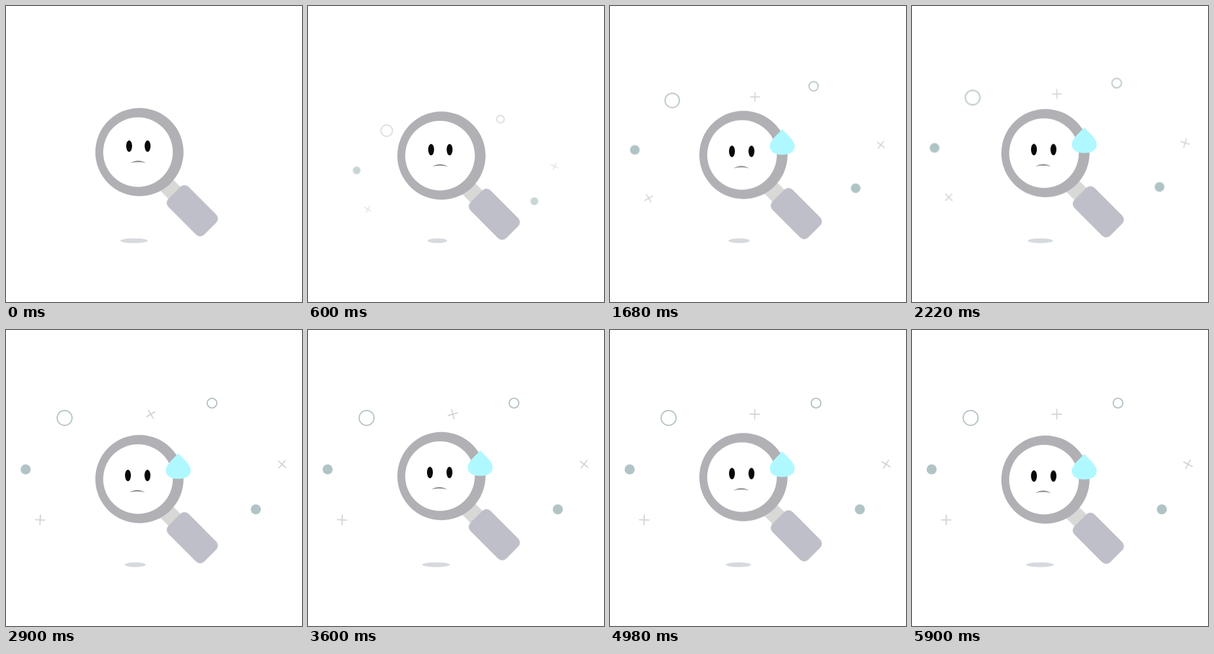
An HTML page without scripts for the animation above (5.92 s loop, 500 by 500 pixels).

```html
<!DOCTYPE html>
<html lang="en">
<head>
<meta charset="utf-8">
<title>Nothing found</title>
<style>
html, body { margin: 0; width: 100%; height: 100%; overflow: hidden; background: #fff; }
svg { display: block; width: 100vw; height: 100vh; }

.anim { animation: 5920ms linear infinite; }
.bob { animation-name: bob; }
.shadow { animation-name: shadow; transform-origin: 224.5px 396.5px; }
.bits { animation-name: burst; transform-origin: 247.7px 420.6px; }
.spin-l { animation-name: spin-l; }
.spin-t { animation-name: spin-t; }
.spin-r { animation-name: spin-r; }
.eye-l { animation-name: look; --dx: -2px; }
.mouth { animation-name: look; --dx: -1.4px; }
.eye-r { animation-name: look; --dx: -.3px; }
.drop { animation-name: drip; transform-origin: 291px 203px; }

@keyframes bob {
  0%, 20.27%, 40.541%, 60.811%, 81.081% { transform: translateY(0); }
  10.135%, 30.405%, 50.676%, 70.946%, 91.216%, 100% { transform: translateY(6px); }
}
@keyframes shadow {
  0%, 20.27%, 40.541%, 60.811%, 81.081%, 99.66%, 100% { transform: scaleX(1); }
  10.135%, 30.405%, 50.676%, 70.946%, 91.216% { transform: scaleX(.71); }
}
@keyframes burst {
  0% { transform: scale(0); opacity: 0; }
  14.53% { transform: scale(1.105); opacity: 1; }
  23.65% { transform: scale(.95); }
  48.99%, 100% { transform: scale(1); opacity: 1; }
}
@keyframes spin-l {
  0% { transform: rotate(80deg); }
  10.135% { transform: rotate(33deg); }
  20.27% { transform: rotate(-17deg); }
  37.5% { transform: rotate(-45deg); }
  48.99% { transform: rotate(-87deg); }
  72.64% { transform: rotate(-87deg); }
  100% { transform: rotate(-90deg); }
}
@keyframes spin-t {
  0%, 37.5% { transform: rotate(0deg); }
  48.99% { transform: rotate(-31deg); }
  72.64% { transform: rotate(2deg); }
  91.2%, 100% { transform: rotate(0deg); }
}
@keyframes spin-r {
  0% { transform: rotate(0deg); }
  10.135% { transform: rotate(25deg); }
  20.27% { transform: rotate(55deg); }
  37.5% { transform: rotate(17deg); }
  48.99% { transform: rotate(41deg); }
  72.64% { transform: rotate(35deg); }
  100% { transform: rotate(27deg); }
}
@keyframes look {
  0%, 16.2% { transform: translate(0, 0); }
  23%, 100% { transform: translate(var(--dx), 4px); }
}
@keyframes drip {
  0%, 19.3% { transform: translate(2px, -8px) scale(.4); opacity: 0; }
  20.27% { transform: translate(2px, -7px) scale(.45); opacity: .15; }
  27%, 100% { transform: none; opacity: 1; }
}
</style>
</head>
<body>
<svg viewBox="0 0 500 500">
  <defs>
    <path id="cross" d="M-8.7 0H8.7M0-8.7V8.7" stroke="#cfd2d5" stroke-width="1.8"/>
  </defs>

  <g class="anim bits">
    <g fill="none" stroke="#b2c0c4" stroke-width="2">
      <circle cx="99" cy="148.5" r="12.6"/>
      <circle cx="348" cy="123.5" r="8.2"/>
    </g>
    <g fill="#b1c4c5">
      <circle cx="33.2" cy="235.5" r="8.5"/>
      <circle cx="422" cy="303" r="8.5"/>
    </g>
    <g transform="translate(57.7 320.8)"><use href="#cross" class="anim spin-l"/></g>
    <g transform="translate(244.6 142.3)"><use href="#cross" class="anim spin-t"/></g>
    <g transform="translate(466.3 226.8)"><use href="#cross" class="anim spin-r"/></g>
  </g>

  <ellipse class="anim shadow" cx="216.3" cy="396.5" rx="23.3" ry="4" fill="#d6dade"/>

  <g class="anim bob">
    <g transform="translate(314.7 345.8) rotate(45)">
      <rect x="-75" y="-14.3" width="50" height="28.6" fill="#d8d8d7"/>
      <rect x="-42.8" y="-24" width="85.6" height="48" rx="9.8" fill="#bfbfc9"/>
    </g>
    <circle cx="225.4" cy="246.7" r="74.5" fill="#b1b0b5"/>
    <circle cx="223" cy="246.7" r="58.8" fill="#fff"/>
    <g fill="#0a0a0a">
      <ellipse class="anim eye-l" cx="208" cy="236.6" rx="5" ry="9.6"/>
      <ellipse class="anim eye-r" cx="239.2" cy="236.6" rx="5" ry="9.6"/>
    </g>
    <path class="anim mouth" d="M210.2 265.2Q223 257.4 236.2 265.2Q223 262.4 210.2 265.2Z" fill="#8e8d92"/>
    <path class="anim drop" fill="#b0f8ff"
      d="M291 203C295 209 312 221 312 232C312 242 303 246.5 291 246.5C279 246.5 270 242 270 232C270 221 287 209 291 203Z"/>
  </g>
</svg>
</body>
</html>
```
